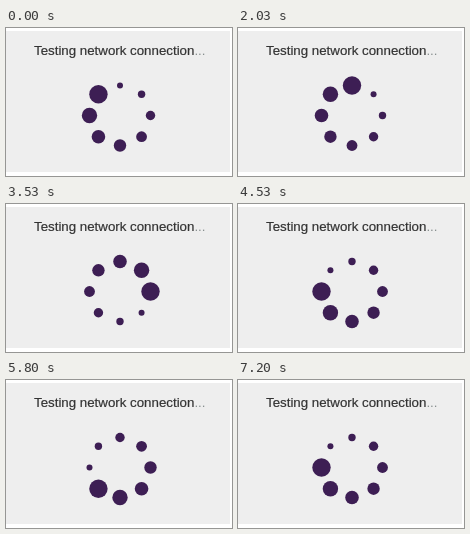
An HTML page for the animation above (7.23 s loop, 226 by 148 pixels).

```html
<!DOCTYPE html>
<html lang="en">
<head>
<meta charset="utf-8">
<title>Network test</title>
<style>
  html, body { margin: 0; width: 100%; height: 100%; overflow: hidden; background: #fff; }
  svg { display: block; }
  text { font: 13.3px "Liberation Sans", Arial, sans-serif; fill: #333; stroke: #333; stroke-width: .2px; }
  tspan { fill: #888f8f; stroke: none; }
  #ring { fill: #3d1e54; filter: blur(.4px); }
</style>
</head>
<body>
<svg width="226" height="148" viewBox="0 0 226 148">
  <rect y="3" width="224" height="141" fill="#eee"/>
  <text x="28" y="27">Testing network connection<tspan>...</tspan></text>
  <g id="ring"></g>
</svg>
<script>
  const LOOP = 7230;
  const STEPS_PER_MS = 0.012;
  const START = 7.66;
  // Radii from the leading dot back along its tail
  const radii = [9.2, 7.7, 6.8, 6.2, 5.4, 4.7, 3.7, 3];
  const ring = document.getElementById("ring");

  const dots = radii.map((_, i) => {
    const angle = i * Math.PI / 4;
    const dot = document.createElementNS("http://www.w3.org/2000/svg", "circle");
    dot.setAttribute("cx", 114 + 30.5 * Math.sin(angle));
    dot.setAttribute("cy", 87.5 - 30 * Math.cos(angle));
    ring.append(dot);
    return dot;
  });

  function draw() {
    const time = performance.now() % LOOP;
    const head = Math.floor(START + time * STEPS_PER_MS) % 8;
    dots.forEach((dot, i) => dot.setAttribute("r", radii[(head - i + 8) % 8]));
    requestAnimationFrame(draw);
  }
  draw();
</script>
</body>
</html>
```
